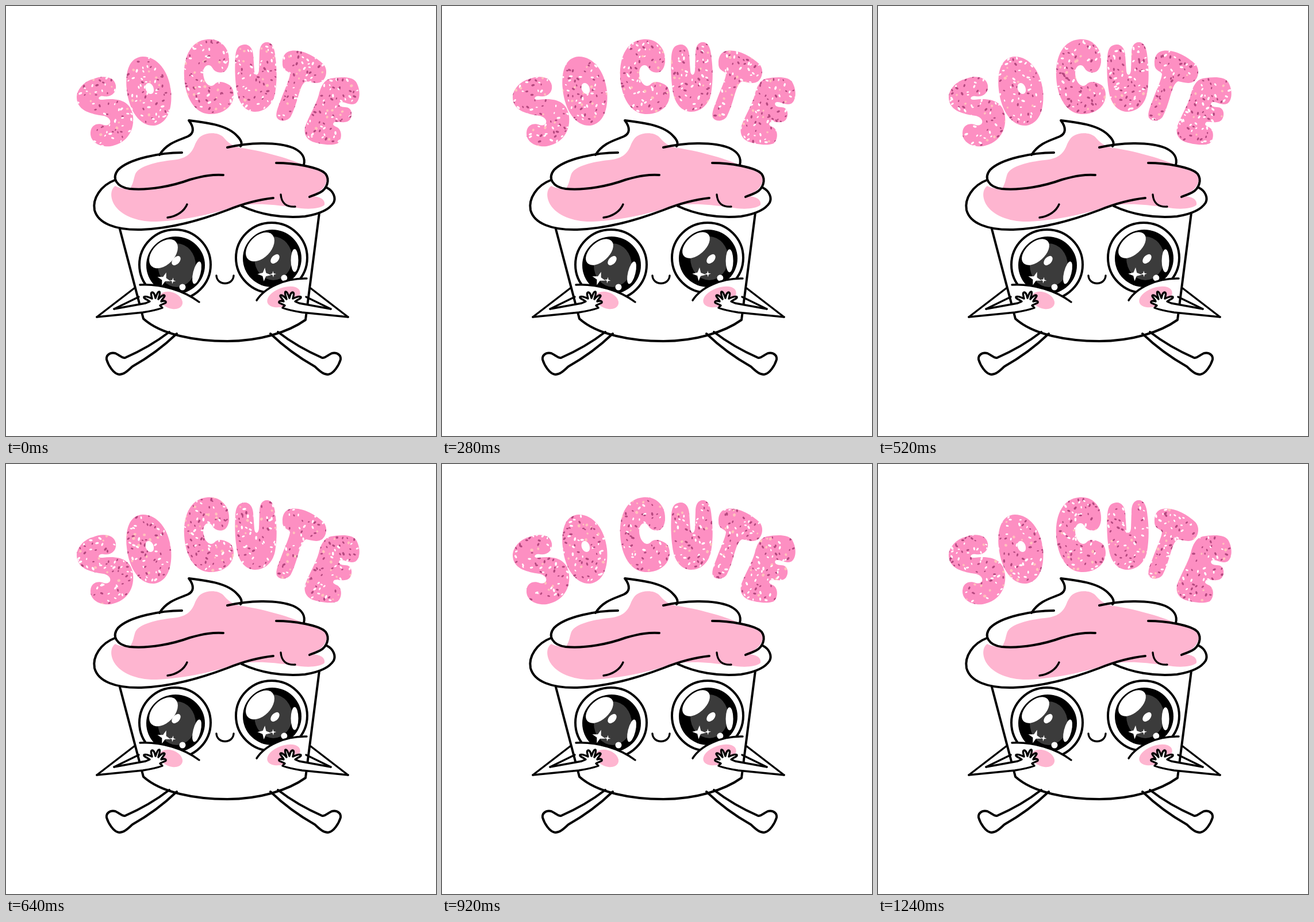
Write an HTML page with a canvas that moves like this. It is 748 by 748 pixels and loops after 1280 ms.

```html
<!DOCTYPE html>
<html>
<head>
<meta charset="utf-8">
<style>
html, body { margin: 0; width: 100%; height: 100%; overflow: hidden; background: #fff; }
canvas { display: block; }
</style>
</head>
<body>
<canvas id="stage" width="748" height="748"></canvas>
<script>
const ctx = document.getElementById('stage').getContext('2d');
const STEP = 40, STEPS = 32, PINK = '#feb5d0';
ctx.lineCap = ctx.lineJoin = 'round';

function fill(path, color) {
  ctx.fillStyle = color;
  ctx.fill(path instanceof Path2D ? path : new Path2D(path), 'evenodd');
}
function line(path, width = 4) {
  ctx.lineWidth = width;
  ctx.strokeStyle = '#000';
  ctx.stroke(new Path2D(path));
}
function oval(x, y, rx, ry, deg, color) {
  ctx.beginPath();
  ctx.ellipse(x, y, rx, ry, deg * Math.PI / 180, 0, 7);
  ctx.fillStyle = color;
  ctx.fill();
}
function star(x, y, r, pinch, deg) {
  ctx.beginPath();
  for (let i = 0; i < 8; i++) {
    const a = i * Math.PI / 4 + deg * Math.PI / 180, d = i % 2 ? r * pinch : r;
    ctx.lineTo(x + d * Math.cos(a), y + d * Math.sin(a));
  }
  ctx.fillStyle = '#fff';
  ctx.fill();
}
// Draws once as is and once flipped, where x + x' = sum.
function mirrored(sum, draw) {
  draw();
  ctx.save();
  ctx.transform(-1, 0, 0, 1, sum, 0);
  draw();
  ctx.restore();
}
function random(seed) {
  return () => {
    seed = seed + 0x6D2B79F5 | 0;
    let t = Math.imul(seed ^ seed >>> 15, 1 | seed);
    t = t + Math.imul(t ^ t >>> 7, 61 | t) ^ t;
    return ((t ^ t >>> 14) >>> 0) / 4294967296;
  };
}

const letters = new Path2D([
  // S
  'M152,127C165,121 188,121 191,138C193,153 180,159 170,157C161,155 157,164 168,163C195,159 218,165 221,192C224,222 205,240 182,244C162,246 146,236 147,220C148,206 160,203 170,207C180,210 186,201 177,194C170,189 160,191 150,187C135,183 123,175 123,158C124,143 138,130 152,127Z',
  // O
  'M237,88C262,87 283,112 287,148C290,180 280,205 258,208C235,210 214,185 210,145C207,112 215,90 237,88Z',
  'M247,134C254,133 258,142 257,148C256,154 249,155 245,149C241,143 242,135 247,134Z',
  // C
  'M350,58C372,56 390,72 388,98C386,113 378,118 368,115C358,112 360,103 352,103C343,104 342,115 344,124C347,137 356,142 362,137C368,130 376,131 386,136C396,140 399,156 393,168C386,182 370,189 353,188C328,186 312,160 310,124C308,85 324,60 350,58Z',
  // U
  'M410,68C422,64 429,73 430,85L432,113C433,122 439,122 440,112L441,82C441,70 446,62 455,63C465,64 468,78 469,92C471,108 472,130 468,152C464,172 450,184 433,184C415,183 404,168 401,145C398,125 398,105 399,88C400,76 403,70 410,68Z',
  // T
  'M496,78C515,75 538,88 552,101C560,110 558,124 550,131C541,137 530,132 522,131C515,134 512,145 508,158C504,172 499,186 495,193C489,201 476,202 471,194C468,186 475,172 480,158C485,145 493,128 494,119C494,113 481,114 481,101C480,88 486,79 496,78Z',
  // E
  'M565,126C582,123 602,122 609,132C617,145 617,165 607,170C597,174 586,164 580,168C577,173 583,176 590,176C602,176 604,190 598,198C590,206 577,200 571,202C566,207 572,209 576,211C585,216 585,232 577,239C565,244 545,240 533,236C521,231 517,220 521,208C528,190 539,172 544,155C547,140 554,128 565,126Z'
].join(''));

function glitter(step) {
  const place = random(7), pick = random(step * 977 + 13), cell = 8;
  ctx.save();
  fill(letters, '#fd8fc2');
  ctx.clip(letters, 'evenodd');
  for (let y = 56; y < 248; y += cell)
    for (let x = 120; x < 620; x += cell) {
      const fx = x + place() * cell, fy = y + place() * cell, deg = place() * 180;
      const kind = pick(), size = 0.65 + pick() * 0.5;
      if (kind < 0.26) oval(fx, fy, 2.7 * size, 1.6 * size, deg, '#b5487f');
      else if (kind < 0.52) oval(fx, fy, 2.9 * size, 1.6 * size, deg, '#fff');
      else if (kind < 0.6) oval(fx, fy, 2.4 * size, 2.1 * size, deg, '#fec3bd');
    }
  ctx.restore();
}

function eye(x, y, deg, glintX, glintY, shine) {
  const dx = shine ? 1 : -1, dy = shine ? 1 : 0;
  ctx.save();
  ctx.translate(x, y);
  ctx.lineWidth = 4;
  ctx.strokeStyle = '#000';
  ctx.beginPath();
  ctx.ellipse(-1, -1, 62, 61, 0, 0, 7);
  ctx.stroke();
  oval(0, 0, 51, 50, 0, '#000');
  oval(2, 0, 33, 38, 0, '#3b3b3b');
  if (shine) oval(-21, -20, 30, 19, -46, '#fff');
  else oval(-21, -23, 28.5, 16.5, -42, '#fff');
  oval(glintX, glintY, 9.5, 6, -48, '#fff');
  ctx.rotate(deg * Math.PI / 180);
  oval(36 + dx, 13, 6.5, 20, 14, '#fff');
  oval(12, 38, 5.5, 5.5, 0, '#fff');
  star(-21 + dx, 23 + dy, 12, 0.34, 18);
  star(-6 + dx, 26 + dy, 5.5, 0.3, 10);
  ctx.restore();
}

function leg() {
  line('M284,567C262,584 232,601 207,612C202,613 197,607 190,604C180,602 174,608 175,615C178,625 187,640 197,641C206,641 213,633 220,627C245,613 274,592 297,570');
}

function arm() {
  const hand = 'L250,514C245,510 239,509 240,506C243,504 250,507 254,509C253,504 251,499 254,498C258,498 259,504 260,508C262,503 264,496 267,497C269,499 266,505 265,510C269,505 275,501 276,504C276,507 271,510 270,514C275,512 279,513 278,516C276,518 270,519 268,521L272,525';
  const forearm = 'M188,527L243,517' + hand + 'C262,529 250,531 238,533L158,541';
  fill(forearm, '#fff');
  line(forearm, 3.4);
  line('M223,491L158,541M188,527L231,506', 3.4);
}

function frosting() {
  fill('M340,226C350,220 368,219 378,228C385,236 392,244 410,247C440,251 490,264 519,277C545,280 556,290 558,300C558,315 545,325 528,331C545,330 556,336 554,346C545,354 520,354 500,350C475,347 450,344 430,345L405,346C370,360 310,373 262,375C230,376 200,365 188,345C180,330 183,318 190,313C200,318 210,318 216,317C222,308 222,300 225,292C232,278 262,271 290,268C312,266 322,258 328,243C331,235 335,229 340,226Z', PINK);
  line('M267,259C280,238 300,234 316,227C327,222 328,212 318,199C350,203 385,207 402,226C410,234 411,240 408,244');
  line('M306,255C270,255 215,265 195,285C183,300 193,315 215,318C250,321 290,313 320,302C345,295 360,293 378,294');
  line('M385,246C420,238 470,235 500,247C517,255 521,265 518,277');
  line('M470,273C500,273 545,280 556,292C564,303 558,318 547,324C540,328 532,330 528,332');
  line('M558,316C570,322 574,334 570,342C562,355 545,362 520,366C480,370 440,362 410,348');
  line('M189,303C165,312 150,335 154,355C160,378 190,390 235,389C290,387 340,372 385,355C410,345 435,337 465,334');
  line('M281,368C297,366 310,357 315,345M478,328C479,342 487,350 503,349', 3.4);
}

function draw(step) {
  const shine = step % 2 === 0;
  ctx.fillStyle = '#fff';
  ctx.fillRect(0, 0, 748, 748);
  glitter(step);

  mirrored(757, leg);
  line('M198,388L239,544C270,572 330,583 385,583C440,583 490,568 521,546L545,360');
  eye(295, 451, 0, 1, -8, shine);
  eye(463, 439, -14, 5, 1, shine);
  line('M366,469C367,487 395,487 396,469', 3.4);

  const leftCheek = 'M233,485C270,483 310,495 336,515', rightCheek = 'M436,512C450,490 485,473 523,474';
  fill(leftCheek + 'L330,532L242,532Z', '#fff');
  fill(rightCheek + 'L520,520L440,525Z', '#fff');
  oval(287, 512, 21, 14, 22, PINK);
  oval(483, 506, 30, 16, -20, PINK);
  line(leftCheek, 3.4);
  line(rightCheek, 3.4);

  mirrored(753, arm);
  frosting();
}

function tick() {
  draw(Math.floor(performance.now() / STEP) % STEPS);
  requestAnimationFrame(tick);
}
tick();
</script>
</body>
</html>
```
